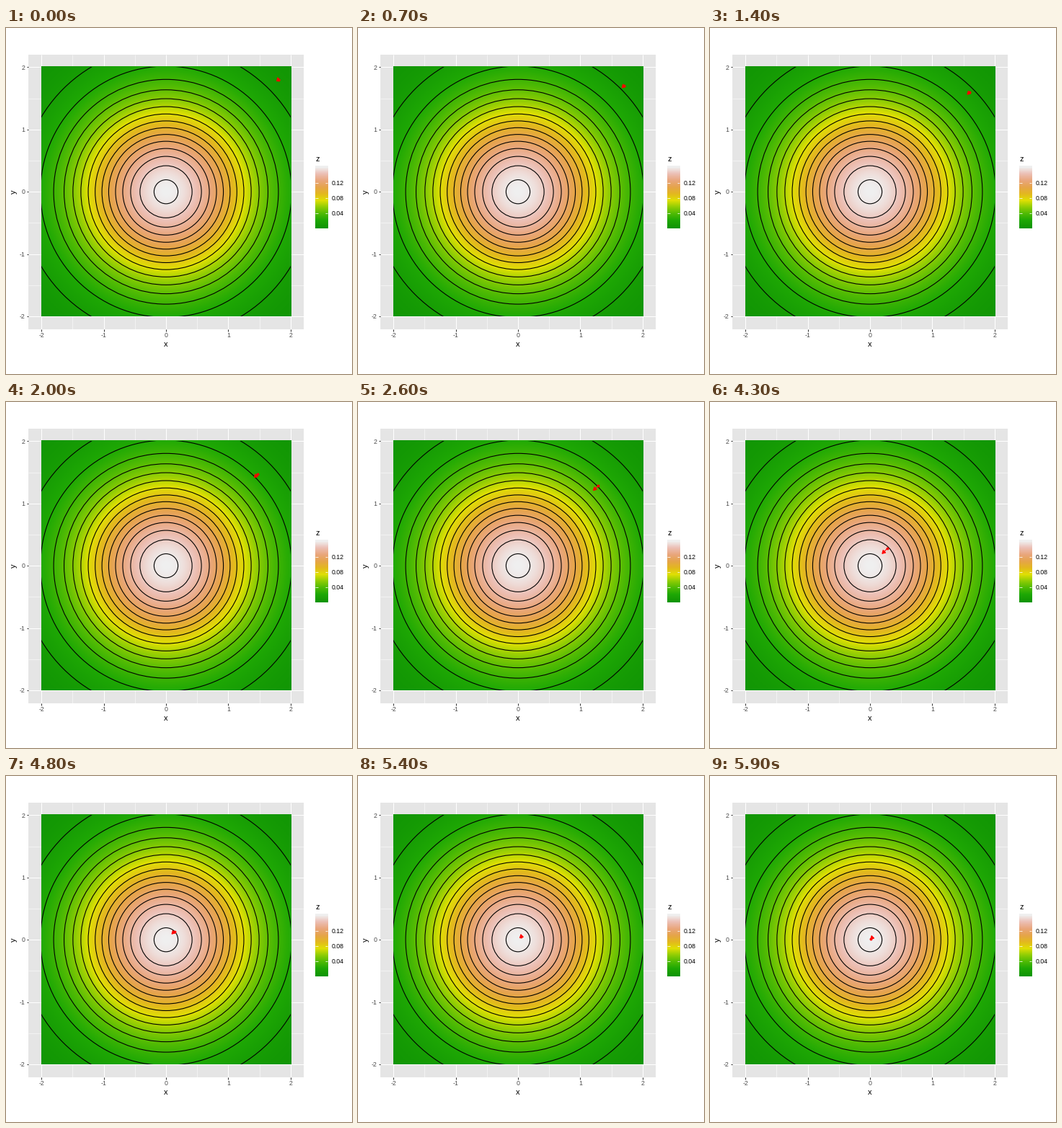
A matplotlib script for the animation above (6 s loop, 480 by 480 pixels).

```python
import colorsys

import matplotlib.pyplot as plt
import numpy as np
from matplotlib.animation import FuncAnimation
from matplotlib.colors import LinearSegmentedColormap
from matplotlib.patches import Circle, Polygon, Rectangle

plt.rcParams["font.family"] = "Liberation Sans"

SIZE, FRAMES, INTERVAL = 480, 60, 100
CX, CY, UNIT = 222, 227.2, 86.4      # plot origin and pixels per data unit
EDGE, PAD = 2.005, 2.2055            # half-widths of the raster and the panel
RATE, STEPS = 2, 31                  # gradient ascent
HEAD = 5                             # arrow head side length


def px(x):
    return CX + UNIT * x


def py(y):
    return CY - UNIT * y


def density(x, y):
    return np.exp(-(x**2 + y**2) / 2) / (2 * np.pi)


def terrain():
    """Ten terrain colours, slightly darkened."""
    low = [(h, 1, v) for h, v in zip(np.linspace(1/3, 1/6, 5),
                                     np.linspace(0.65, 0.9, 5))]
    high = list(zip(np.linspace(1/6, 0, 6), np.linspace(1, 0, 6),
                    np.linspace(0.9, 0.95, 6)))[1:]
    rgb = np.array([colorsys.hsv_to_rgb(*c) for c in low + high]) ** 1.23
    floor = np.array([0.07, 0, 0.016])
    return LinearSegmentedColormap.from_list("terrain10", np.maximum(rgb, floor), 512)


fig = plt.figure(figsize=(SIZE / 72, SIZE / 72), dpi=72, facecolor="white")
ax = fig.add_axes([0, 0, 1, 1])
ax.axis("off")
cmap = terrain()
z_min, z_max = density(2, 2), density(0, 0)


def line(x, y, color, width, z):
    ax.plot(x, y, color=color, lw=width, zorder=z, solid_capstyle="butt")


def label(x, y, text, size, color="black", **kw):
    ax.text(x, y, text, fontsize=size, color=color, **kw)


def draw_panel():
    left, right, top, bottom = px(-PAD), px(PAD), py(PAD), py(-PAD)
    ax.add_patch(Rectangle((left, top), right - left, bottom - top,
                           fc="#e5e5e5", ec="none", zorder=0))
    for v in np.arange(-2, 2.1, 0.5):
        major = v == int(v)
        width = 1.07 if major else 0.53
        line([px(v)] * 2, [top, bottom], "white", width, 1)
        line([left, right], [py(v)] * 2, "white", width, 1)
        if major:
            line([px(v)] * 2, [bottom, bottom + 2.75], "#333333", 1.07, 1)
            line([left - 2.75, left], [py(v)] * 2, "#333333", 1.07, 1)
            label(px(v), 429, f"{v:.0f}", 8.8, "#4d4d4d", ha="center")
            label(26.3, py(v) + 3.2, f"{v:.0f}", 8.8, "#4d4d4d", ha="right")
    label(CX, 442, "x", 11, ha="center")
    label(11, CY, "y", 11, ha="center", va="center", rotation=90)


def draw_surface():
    v = np.linspace(-2, 2, 401)
    xx, yy = np.meshgrid(v, v)
    ax.imshow(density(xx, yy), cmap=cmap, vmin=z_min, vmax=z_max, zorder=2,
              extent=(px(-EDGE), px(EDGE), py(-EDGE), py(EDGE)),
              origin="lower", aspect="auto")
    clip = Rectangle((px(-2), py(2)), 4 * UNIT, 4 * UNIT, transform=ax.transData)
    for level in np.arange(1, 16) * (z_max - z_min) / 15:
        r = np.sqrt(-2 * np.log(level / z_max))
        ring = Circle((CX, CY), r * UNIT, fill=False, ec="black", lw=1.1, zorder=3)
        ax.add_patch(ring)
        ring.set_clip_path(clip)


def draw_legend():
    x0, x1, y0, y1 = 429, 446.3, 192, 278.4
    half_bin = (y1 - y0) / 40
    ax.imshow(np.linspace(0, 1, 20)[:, None], cmap=cmap, origin="lower",
              extent=(x0, x1, y1, y0), interpolation="bilinear",
              aspect="auto", zorder=2)
    for v in (0.04, 0.08, 0.12):
        share = (v - z_min) / (z_max - z_min)
        y = y1 - half_bin - share * (y1 - y0 - 2 * half_bin)
        line([x0, x0 + 3.5], [y, y], "white", 0.8, 4)
        line([x1 - 3.5, x1], [y, y], "white", 0.8, 4)
        label(451.5, y + 3.5, f"{v:.2f}", 8.8)
    label(x0, 185, "z", 11)


def ascend():
    path = [1.8]
    for _ in range(STEPS):
        p = path[-1]
        path.append(p - RATE * p * density(p, p))
    return path


draw_panel()
draw_surface()
draw_legend()
path = ascend()

dot, = ax.plot([], [], "o", color="red", ms=3.9, mew=0, zorder=6)
shaft, = ax.plot([], [], color="red", lw=1.07, zorder=6, solid_capstyle="butt")
head = Polygon(np.zeros((3, 2)), fc="red", ec="red", lw=1.07,
               joinstyle="miter", zorder=6)
ax.add_patch(head)

ax.set_xlim(0, SIZE)
ax.set_ylim(SIZE, 0)

angles = np.radians([15, 75])
barbs = HEAD * np.column_stack([np.cos(angles), -np.sin(angles)])


def update(frame):
    step = (frame + 1) // 2
    a, b = path[step], path[step + 1]
    tip = np.array([px(b), py(b)])
    dot.set_data([px(a)], [py(a)])
    shaft.set_data([px(a), tip[0]], [py(a), tip[1]])
    head.set_xy([tip, tip + barbs[0], tip + barbs[1]])
    return dot, shaft, head


anim = FuncAnimation(fig, update, frames=FRAMES, interval=INTERVAL,
                     repeat=True, repeat_delay=0, blit=False)
plt.show()
```
